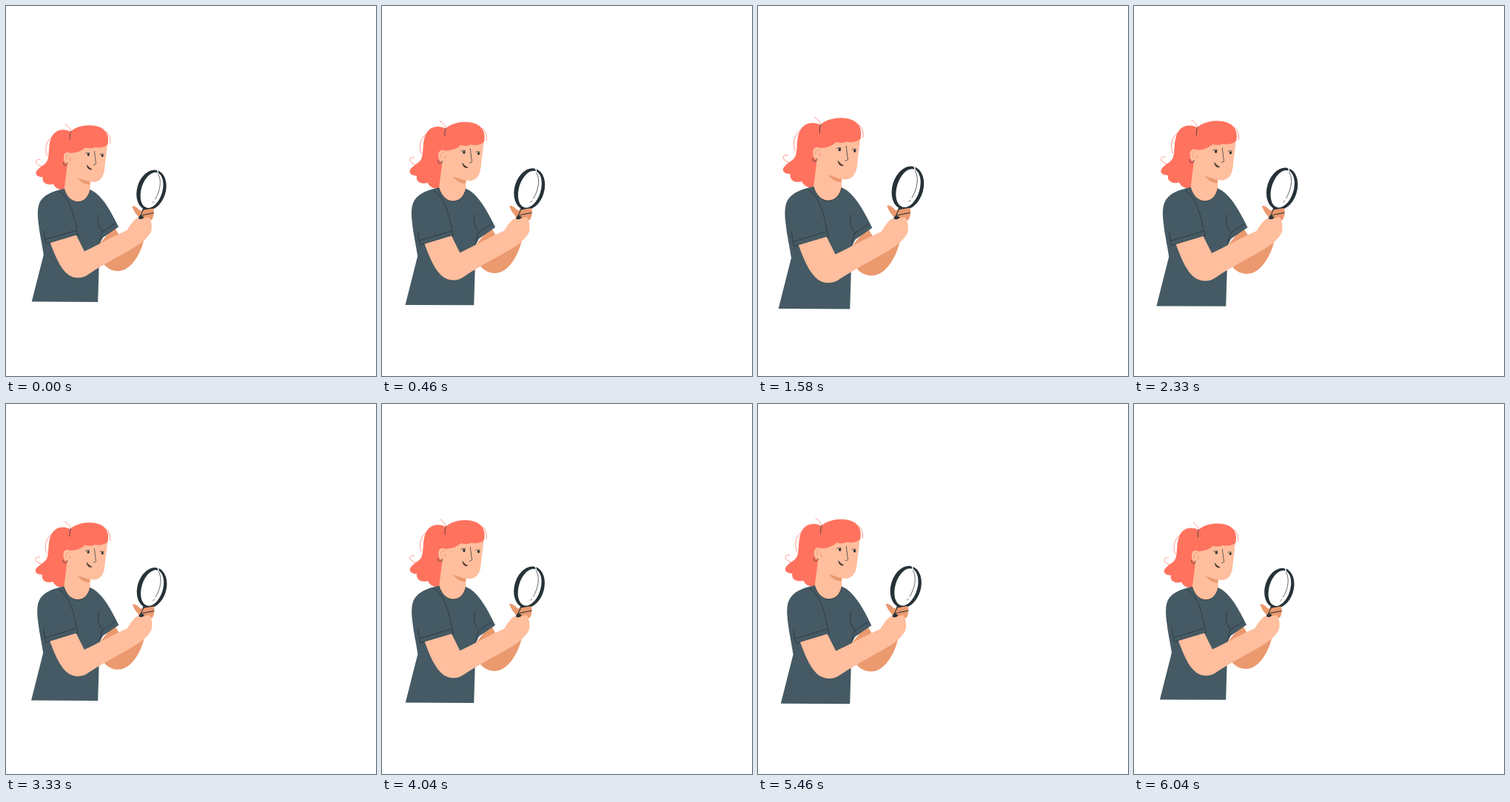
Write an HTML page that moves like this. It is 500 by 500 pixels and loops after 6.08 s.

```html
<!DOCTYPE html>
<html lang="en">
<head>
<meta charset="utf-8">
<title>Woman with a magnifying glass</title>
<style>
  html, body { margin: 0; width: 100%; height: 100%; overflow: hidden; background: #fff; }
  svg { display: block; width: 100vw; height: 100vh; }
  .hair { fill: #ff725e; }
  .skin { fill: #ffbe9d; }
  .shade { fill: #eb996e; }
  .shirt { fill: #455a64; }
  .dark { fill: #263238; }
  .line, .strand { fill: none; stroke: #263238; stroke-width: .7; stroke-linecap: round; stroke-linejoin: round; }
  .strand { stroke: #ff725e; }
</style>
</head>
<body>
<svg viewBox="0 0 500 500">
  <g id="woman">
    <!-- far arm -->
    <path class="shade" d="M126 322 L146 298 L155 313 L187 312 C184 331 170 358 151.500 358 C143 358 136 354 132 348 L124 342Z"/>

    <!-- ponytail -->
    <path class="hair" d="M89 171 C80 165.500 67 166 61.500 178 C57 188 59 200 56.500 208 C54 215 48 216 43.500 221 C37.500 226.500 42 231.500 50 231.500 C48 238 55 243.500 64 240.500 C67 247.500 75 249.500 81 247.500 L90 200Z"/>
    <path class="strand" d="M62.500 177 C54 183 52 194 56 203 M55 217.500 C47 218 42 214.500 41 211.500 C40.500 208.500 43.500 206.500 46.500 208"/>
    <path class="strand" d="M80 160.500 C83 162 86 165 88 169"/>

    <!-- shirt -->
    <path class="shirt" d="M78.500 247 C67 249.500 57 252.500 50 259.500 C42 267 42.500 280 44 293 C45.500 308 49 322 51 336 L35 399.300 L124.200 399.700 L125.500 356 L126.500 321 L131 313 L152 298.500 C145 284 136 267 127 258 C122 252.500 118 250 113.800 248.500Z"/>

    <!-- neck and face -->
    <path class="skin" d="M84 206 L81 230 L78.800 247.500 C82.500 259.500 90 264.500 97 264.500 C106 264.500 111.500 258 113.800 248.500 L113.600 236 L97 220Z"/>
    <path class="line" d="M78.800 247.500 C82.500 259.500 90 264.700 97 264.700 C106 264.700 111.500 258 113.800 248.500"/>
    <path class="shade" d="M97 232.500 C101 238 107 241.800 113.600 241.500 L113.600 237 C107 236 102 234 97 232.500Z"/>
    <path class="skin" d="M84 192 L137 182 C137 194 134.500 206 133.500 217 C133 227 130 236 121 237.800 C111 239 97 233 90 222Z"/>

    <!-- front hair -->
    <path class="hair" d="M84 201 C85 195 83 175 88 169.500 C95 163 106 161.500 114 161.500 C129 162 141 169 137.500 187.300 C133 191.500 126 192.500 120 191 C117 193 111 193 107 191.500 C102 197 93 199 87 199Z"/>
    <path class="strand" d="M135.500 170 C139.500 174 141.300 179 140.500 186"/>
    <path class="line" d="M88 169.500 C86.500 172 86 176 86.500 180"/>

    <!-- ear -->
    <path class="skin" d="M87 199 C81 196 77.500 200 78 206 C78 212 82 215 86 212Z"/>
    <path class="line" style="stroke:#eb996e" d="M85.500 201 C81.500 201 80.500 204 81.500 208"/>
    <path class="line" d="M78 211.500 C76.500 214 79 216 81.500 215 C83 214.200 83.300 213 83 212"/>

    <!-- features -->
    <ellipse class="dark" cx="111.300" cy="201" rx="1.600" ry="1.900"/>
    <ellipse class="dark" cx="130.200" cy="202.500" rx="1.500" ry="1.800"/>
    <path class="line" d="M107.500 199.500 C108.800 198.500 110.500 198.200 113 198.800 M127 200.500 C128.500 199.800 130 199.800 132 200.500"/>
    <path class="line" d="M119.500 196.500 C120 202 120.800 208 121.600 213 C121 214.500 119.500 215 118.500 214.700"/>
    <path d="M109.600 215.500 C109.800 219.500 112.500 221.800 116 220.700 C113.500 219.500 111.500 218 109.600 215.500Z" class="line" style="fill:#7a3b22"/>

    <!-- shirt seams -->
    <path class="line" d="M72 251 C86 258 92 282 97 309 M51.500 304 C52 311 53 316 54.500 321.500 L97 309 M53.500 315.500 L94 303.500"/>
    <path class="line" d="M125.500 282 C123 289 124 297 130.500 305 L147.500 294 M130.500 305 C128.500 309 127 314 126.500 321"/>

    <!-- magnifying glass -->
    <g transform="rotate(17 196.300 248.800)">
      <ellipse class="dark" cx="196.300" cy="248.800" rx="19.300" ry="27.700"/>
      <ellipse fill="#fff" cx="196.900" cy="248.800" rx="14.200" ry="24.700"/>
    </g>
    <path d="M203.800 220.500 L205.500 226" stroke="#fff" stroke-width="1.300"/>
    <path class="line" d="M205.500 227.500 C211 237 207.500 251 201.500 261 M199.500 264 L197.800 266"/>
    <path d="M188 272 L184.500 279" stroke="#263238" stroke-width="4"/>

    <!-- hands and near arm -->
    <path class="shade" d="M170.300 271 C173 269.500 177 272 181 276.500 L198.500 273.500 C200.500 277 200.200 283 197 289 L180 288 L177.500 283 C174 280 172 275 170.300 271Z"/>
    <path class="line" style="stroke-width:1" d="M185 276 L181.500 283.500 C187 281.500 193 281 199 279.500"/>
    <path class="dark" d="M181 283 L186.500 285 L183.500 289.500 L178.500 287Z"/>
    <path class="skin" d="M60 320 L95 309.500 L106 331.500 C126 322 145 311 163.500 303 C167 297 172 289.500 177 286.500 C180 288.500 183 288.500 186 286.500 L192.500 285 C196.500 288 197.500 299 196 304.500 C193.500 310 187 317 182 320.500 C164 333 134 347 112 362 C104 368.500 93 368.500 85 363.500 C73 355 66 336 60 320Z"/>
  </g>
</svg>
<script>
  const LOOP = 6080, FPS = 24;
  const CENTER = [123.2, 283];
  // [time in ms, zoom]: straight ramps between turning points
  const ZOOM = [[-30, 1], [1190, 1.1], [3590, 1], [4810, 1.1], [6050, 1], [7270, 1.1]];
  const woman = document.getElementById('woman');

  function zoomAt(t) {
    const i = ZOOM.findIndex(([end]) => t < end);
    const [t0, a] = ZOOM[i - 1], [t1, b] = ZOOM[i];
    return a + (b - a) * (t - t0) / (t1 - t0);
  }

  function draw(now) {
    // poses advance in whole ticks of the frame rate
    const tick = Math.floor((now % LOOP + 5) * FPS / 1000);
    const zoom = zoomAt(tick * 1000 / FPS);
    const [x, y] = CENTER;
    woman.setAttribute('transform', `translate(${x} ${y}) scale(${zoom}) translate(${-x} ${-y})`);
  }

  const start = performance.now();
  function loop() {
    draw(performance.now() - start);
    requestAnimationFrame(loop);
  }
  loop();
</script>
</body>
</html>
```
